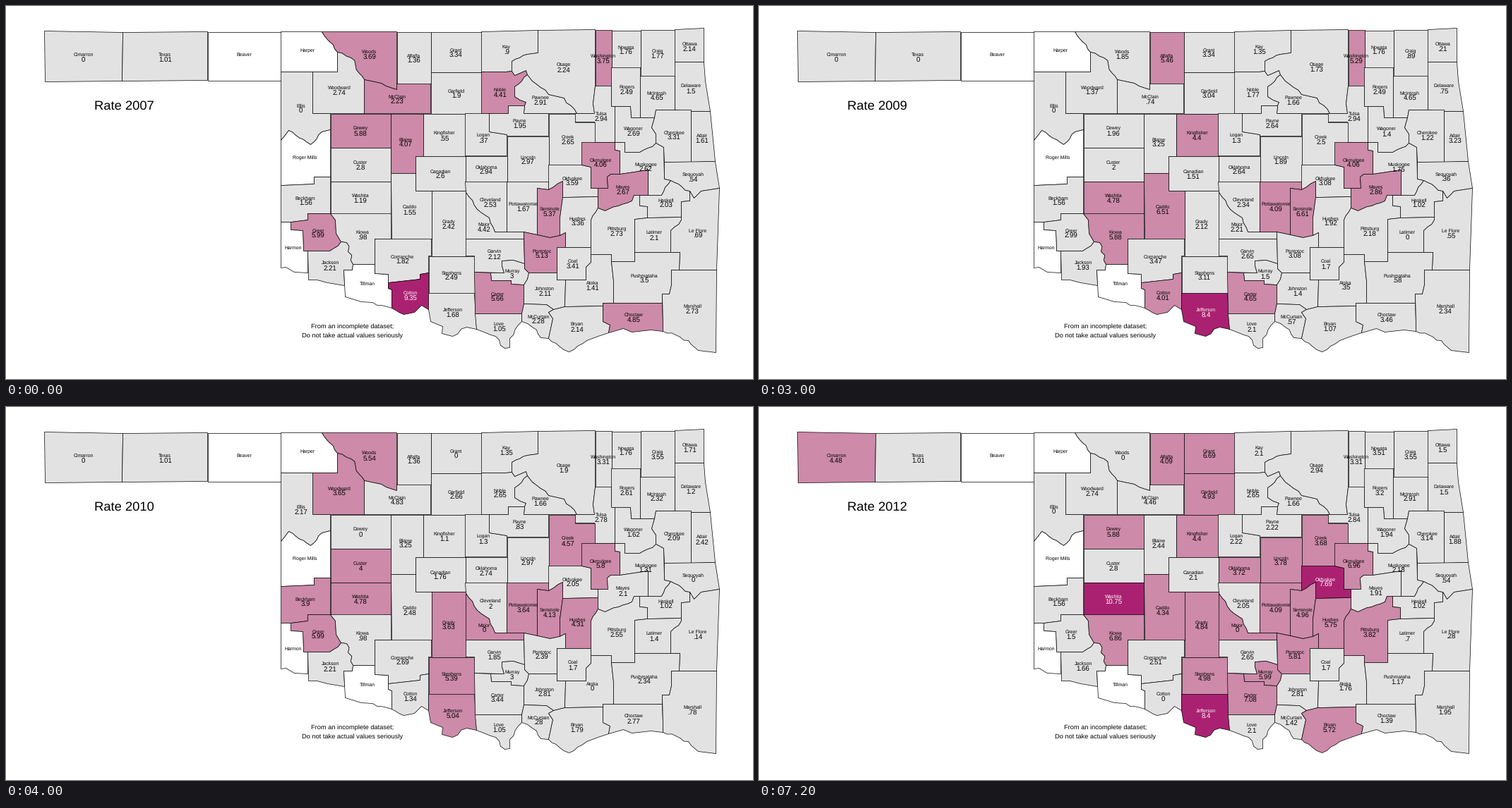
A matplotlib script that plays this animation: 1058x529 px, repeating every 8000 ms.

```python
import matplotlib.pyplot as plt
import numpy as np
from matplotlib.animation import FuncAnimation

W, H, DPI = 1058, 529, 100
PX = 72 / DPI
LOW, MID, HIGH = "#e2e2e2", "#cd8aa9", "#ab2171"
MID_FROM, HIGH_FROM = 3.6, 7.2

plt.rcParams.update({"font.family": "Liberation Sans", "text.hinting": "none"})
fig = plt.figure(figsize=(W / DPI, H / DPI), dpi=DPI, facecolor="white")
ax = fig.add_axes([0, 0, 1, 1])
ax.set_xlim(-0.5, W - 0.5)
ax.set_ylim(H - 0.5, -0.5)
ax.axis("off")

rates, areas, names, values = {}, {}, {}, {}


def label(x, y, text, size):
    return ax.text(x, y, text, fontsize=size * PX, ha="center",
                   va="baseline", color="black", zorder=3)


def border(a, b):
    """Survey lines run straight; slanted borders wind like a river.

    The seed comes from the end points, so both neighbours get one line.
    """
    p, q = np.array(sorted((a, b)))
    dx, dy = q - p
    if min(abs(dx), abs(dy)) <= 7:
        return [a]
    length = np.hypot(dx, dy)
    n = max(2, int(length / 6))
    sway = np.random.default_rng([*p, *q]).normal(0, 1.2, n + 1)
    sway[[0, -1]] = 0
    t = np.linspace(0, 1, n + 1)[:, None]
    line = p + t * (q - p) + sway[:, None] * [-dy / length, dx / length]
    return list((line if a < b else line[::-1])[:-1])


def centroid(points):
    x, y = points.T
    x2, y2 = np.roll(points, -1, axis=0).T
    cross = x * y2 - x2 * y
    return [(c * cross).sum() / (3 * cross.sum()) for c in (x + x2, y + y2)]


def county(name, data, *corners):
    """Draw a county from its corners, with the label at its centroid."""
    ends = list(zip(corners[::2], corners[1::2]))
    points = np.array([p for a, b in zip(ends, ends[1:] + ends[:1])
                       for p in border(a, b)], float)
    area = plt.Polygon(points, fc="white", ec="black", lw=0.7 * PX,
                       joinstyle="round", zorder=1)
    ax.add_patch(area)
    x, y = centroid(points)
    names[name] = label(x, y - 0.5, name, 6.9)
    if data:
        rates[name], areas[name] = data, area
        values[name] = label(x, y + 8, "", 9.7)


def box(name, data, x0, y0, x1, y1):
    county(name, data, x0, y0, x1, y0, x1, y1, x0, y1)


# Panhandle and north-west
county("Cimarron", [0, 0, 0, 0, 0, 4.48],
       54, 35, 165, 37, 164, 106, 55, 107)
county("Texas", [1.01, 2.02, 0, 1.01, 2.02, 1.01],
       165, 37, 285, 36, 285, 105, 164, 106)
box("Beaver", None, 285, 36, 389, 105)
county("Harper", None, 389, 36, 447, 36, 469, 65, 469, 93, 389, 93)
county("Woods", [3.69, 1.85, 1.85, 5.54, 1.85, 0],
       447, 36, 553, 36, 553, 118, 531, 109, 507, 104, 488, 73, 469, 65)
county("Woodward", [2.74, 3.65, 1.37, 3.65, 5.94, 2.74],
       469, 65, 488, 73, 507, 104, 507, 152, 434, 152, 434, 93, 469, 93)
county("McClain", [2.23, 1.86, .74, 4.83, 2.6, 4.46],
       507, 104, 531, 109, 553, 118, 553, 109, 601, 109, 601, 152, 507, 152)
county("Ellis", [0, 2.17, 0, 2.17, 6.51, 0],
       389, 93, 434, 93, 434, 152, 459, 152, 459, 175, 447, 178, 431, 196,
       400, 176, 389, 190)
county("Roger Mills", None,
       389, 190, 400, 176, 431, 196, 447, 178, 459, 175, 459, 242,
       436, 242, 436, 252, 389, 254)
box("Alfalfa", [1.36, 0, 5.46, 1.36, 0, 4.09], 553, 36, 601, 109)
box("Grant", [3.34, 0, 3.34, 0, 6.69, 6.69], 601, 36, 673, 93)
box("Garfield", [1.9, 1.14, 3.04, 2.66, 3.04, 4.93], 601, 93, 673, 152)

# North-east
county("Kay", [.9, 1.8, 1.35, 1.35, 2.1, 2.1],
       673, 36, 753, 34, 753, 66, 738, 68, 716, 78, 716, 92, 707, 93, 673, 93)
county("Noble", [4.41, 2.65, 1.77, 2.65, .88, 2.65],
       673, 93, 707, 93, 716, 92, 720, 98, 736, 91, 738, 97, 720, 114,
       720, 128, 736, 136, 734, 141, 711, 141, 711, 152, 673, 152)
county("Pawnee", [2.91, 2.08, 1.66, 1.66, 2.08, 1.66],
       720, 114, 738, 97, 745, 106, 768, 125, 790, 130, 808, 152, 733, 152,
       734, 141, 736, 136, 720, 128)
county("Osage", [2.24, 2.42, 1.73, 1.9, 1.9, 2.94],
       753, 34, 834, 33, 834, 113, 831, 138, 833, 152, 808, 152, 790, 130,
       768, 125, 745, 106, 738, 97, 736, 91, 720, 98, 716, 92, 716, 78,
       738, 68, 753, 66)
box("Washington", [3.75, 3.31, 5.29, 3.31, 2.2, 3.31], 834, 33, 857, 113)
box("Nowata", [1.76, .88, 1.76, 1.76, 2.64, 3.51], 857, 34, 898, 87)
box("Craig", [1.77, 2.66, .89, 3.55, .44, 3.55], 898, 33, 947, 99)
county("Ottawa", [2.14, 1.07, .21, 1.71, 1.28, 1.5],
       947, 33, 988, 31, 988, 79, 947, 79)
county("Delaware", [1.5, .6, .75, 1.2, 1.65, 1.5],
       947, 79, 988, 79, 990, 106, 997, 149, 970, 149, 947, 147)
county("Rogers", [2.49, 3.2, 2.49, 2.61, 2.37, 3.2],
       857, 87, 898, 87, 898, 158, 885, 158, 884, 142, 857, 142)
county("McIntosh", [4.65, 5.23, 4.65, 2.32, 1.74, 2.91],
       898, 99, 947, 99, 947, 147, 920, 147, 918, 158, 898, 158)
county("Tulsa", [2.94, 3.28, 2.94, 2.78, 2.61, 2.84],
       834, 113, 857, 113, 857, 142, 862, 142, 862, 193, 833, 193,
       833, 164, 805, 164, 805, 152, 833, 152, 831, 138)
county("Wagoner", [2.69, 1.08, 1.4, 1.62, 2.37, 1.94],
       862, 142, 884, 142, 885, 158, 918, 158, 914, 172, 920, 181,
       920, 194, 897, 207, 876, 207, 876, 193, 862, 193)
county("Cherokee", [3.31, 1.74, 1.22, 2.09, 2.62, 3.14],
       920, 147, 970, 147, 970, 221, 932, 221, 931, 200, 920, 194,
       920, 181, 914, 172, 918, 158)
county("Adair", [1.61, 2.69, 3.23, 2.42, 2.69, 1.88],
       970, 149, 997, 149, 1004, 220, 970, 221)
county("Sequoyah", [.54, .36, .36, 0, .73, .54],
       932, 221, 1004, 220, 1010, 258, 984, 262, 974, 272, 968, 262,
       941, 247, 932, 245)
county("Muskogee", [2.62, 3.28, 1.75, 1.31, 2.4, 2.18],
       862, 193, 876, 193, 876, 207, 897, 207, 920, 194, 931, 200, 932, 245,
       941, 247, 928, 268, 909, 268, 909, 232, 869, 238, 869, 205, 862, 204)
county("Haskell", [2.03, 4.07, 1.02, 1.02, 0, 1.02],
       897, 268, 928, 268, 941, 247, 968, 262, 968, 276, 956, 277,
       956, 299, 908, 300, 908, 284, 897, 283)

# Centre
box("Dewey", [5.88, 1.96, 1.96, 0, 0, 5.88], 459, 152, 544, 200)
box("Custer", [2.8, 5.2, 2, 4, 1.6, 2.8], 459, 200, 544, 248)
box("Washita", [1.19, 4.78, 4.78, 4.78, 1.19, 10.75], 459, 248, 544, 294)
county("Blaine", [4.07, 2.44, 3.25, 3.25, 4.88, 2.44],
       544, 152, 590, 152, 590, 212, 579, 212, 579, 236, 544, 236)
box("Kingfisher", [.55, 2.2, 4.4, 1.1, 2.2, 4.4], 590, 152, 650, 212)
county("Logan", [.37, 2.22, 1.3, 1.3, .74, 2.22],
       650, 152, 684, 152, 684, 178, 709, 182, 709, 212, 650, 212)
county("Payne", [1.95, 1.11, 2.64, .83, 1.67, 2.22],
       711, 141, 734, 141, 733, 152, 768, 152, 768, 184, 709, 184,
       709, 182, 684, 178, 684, 152, 711, 152)
county("Creek", [2.65, 3.98, 2.5, 4.57, 2.5, 3.68],
       768, 152, 805, 152, 805, 164, 833, 164, 833, 193, 815, 193,
       815, 225, 768, 225)
county("Canadian", [2.6, 1.93, 1.51, 1.76, 1.68, 2.1],
       590, 212, 650, 212, 650, 261, 579, 261, 579, 212)
box("Oklahoma", [2.94, 2.74, 2.64, 2.74, 3, 3.72], 650, 212, 709, 249)
box("Lincoln", [2.97, 1.62, 1.89, 2.97, 4.32, 3.78], 709, 184, 768, 249)
county("Caddo", [1.55, 6.82, 6.51, 2.48, 4.65, 4.34],
       544, 236, 579, 236, 579, 261, 602, 261, 602, 330, 545, 330)
box("Grady", [2.42, 3.33, 2.12, 3.63, 3.33, 4.84], 602, 261, 651, 354)
county("Cleveland", [2.53, 1.86, 2.34, 2, 1.95, 2.05],
       650, 249, 709, 249, 709, 320, 692, 320, 684, 300, 667, 288, 651, 264)
county("Major", [4.42, 2.21, 2.21, 0, 0, 0],
       651, 264, 667, 288, 684, 300, 692, 320, 733, 320, 733, 330, 651, 330)
county("Pottawatomie", [1.67, 4.09, 4.09, 3.64, 3.94, 4.09],
       709, 249, 768, 249, 768, 260, 752, 258, 752, 324, 733, 320, 709, 320)
county("Okfuskee", [3.59, 3.08, 3.08, 2.05, 5.64, 7.69],
       768, 225, 815, 225, 828, 228, 828, 258, 838, 258, 838, 270,
       788, 271, 788, 248, 768, 260)
county("Seminole", [5.37, 3.72, 6.61, 4.13, 4.96, 4.96],
       752, 258, 768, 260, 788, 248, 788, 271, 784, 300, 784, 325,
       770, 328, 752, 324)
county("Hughes", [3.36, 1.92, 1.92, 4.31, 5.75, 5.75],
       788, 271, 838, 270, 838, 286, 828, 303, 828, 342, 792, 342,
       792, 321, 784, 325, 784, 300)
county("Okmulgee", [4.06, 2.9, 4.06, 5.8, 4.06, 6.96],
       815, 193, 862, 193, 862, 204, 869, 205, 869, 238, 856, 238,
       851, 242, 852, 258, 828, 258, 828, 228, 815, 225)
county("Mayes", [2.67, 3.44, 2.86, 2.1, 2.1, 1.91],
       869, 238, 909, 232, 909, 268, 889, 268, 886, 276, 848, 290,
       838, 286, 838, 258, 852, 258, 851, 242, 856, 238)

# South-west
county("Beckham", [1.56, 1.17, 1.56, 3.9, 3.12, 1.56],
       389, 254, 436, 252, 436, 242, 459, 242, 459, 294, 427, 294,
       427, 303, 403, 306, 389, 306)
county("Greer", [5.99, 1.5, 2.99, 5.99, 1.5, 1.5],
       427, 294, 459, 294, 466, 303, 467, 322, 474, 334, 458, 347,
       421, 347, 420, 318, 403, 317, 403, 306, 427, 303)
county("Harmon", None,
       389, 306, 403, 306, 403, 317, 420, 318, 421, 347, 427, 347,
       427, 378, 408, 377, 396, 370, 389, 371)
county("Kiowa", [.98, 1.96, 5.88, .98, 10.78, 6.86],
       459, 294, 545, 294, 545, 330, 522, 330, 522, 366, 491, 366,
       482, 335, 474, 334, 467, 322, 466, 303)
county("Jackson", [2.21, 3.04, 1.93, 2.21, 2.76, 1.66],
       427, 347, 458, 347, 474, 334, 482, 335, 491, 366, 490, 374,
       478, 374, 479, 396, 455, 392, 440, 388, 428, 388)
county("Tillman", None,
       478, 374, 490, 374, 491, 366, 522, 366, 522, 379, 541, 380,
       541, 400, 546, 402, 546, 428, 519, 420, 503, 419, 480, 412)
county("Comanche", [1.82, 3.73, 3.47, 2.69, 3.12, 2.51],
       522, 330, 602, 330, 602, 354, 598, 354, 598, 378, 586, 380,
       586, 387, 541, 392, 541, 380, 522, 379)
county("Cotton", [9.35, 0, 4.01, 1.34, 2.67, 0],
       541, 392, 586, 387, 586, 380, 598, 378, 598, 430, 588, 424,
       578, 434, 563, 437, 546, 428, 546, 402, 541, 400)
box("Stephens", [2.49, 2.9, 3.11, 5.39, 3.32, 4.98], 598, 354, 663, 407)
county("Jefferson", [1.68, 3.36, 8.4, 5.04, 1.68, 8.4],
       598, 407, 663, 407, 666, 458, 652, 455, 632, 468, 617, 464,
       618, 454, 601, 447, 598, 430)
county("Garvin", [2.12, 2.91, 2.65, 1.85, 2.12, 2.65],
       651, 330, 733, 330, 734, 365, 718, 360, 702, 361, 702, 368,
       705, 378, 663, 377, 663, 354, 651, 354)
county("Murray", [3, 1.5, 1.5, 3, 3, 5.99],
       702, 361, 718, 360, 734, 365, 734, 372, 740, 378, 738, 387,
       733, 395, 715, 394, 715, 389, 687, 389, 686, 378, 705, 378, 702, 368)
county("Carter", [5.66, 3.44, 4.65, 3.44, 2.83, 7.08],
       663, 377, 686, 378, 687, 389, 715, 389, 715, 394, 733, 395,
       733, 422, 730, 436, 664, 436)
county("Love", [1.05, 0, 2.1, 1.05, 1.05, 2.1],
       664, 436, 730, 436, 730, 447, 713, 471, 713, 484, 706, 485,
       693, 468, 666, 458)

# South-east
county("Pontotoc", [5.13, 2.05, 3.08, 2.39, 4.79, 5.81],
       733, 320, 752, 324, 770, 328, 784, 325, 792, 321, 792, 342,
       780, 342, 780, 378, 740, 378, 734, 372)
county("Johnston", [2.11, .7, 1.4, 2.81, .7, 2.81],
       740, 378, 780, 378, 780, 388, 792, 388, 791, 426, 775, 430,
       765, 423, 733, 422, 733, 395, 738, 387)
county("Coal", [3.41, 3.41, 1.7, 1.7, 0, 1.7],
       780, 342, 828, 342, 828, 363, 821, 370, 821, 388, 780, 388)
county("Pittsburg", [2.73, 1.45, 2.18, 2.55, 2, 3.82],
       838, 286, 848, 290, 886, 276, 889, 268, 897, 268, 897, 283, 908, 284,
       908, 300, 890, 302, 890, 362, 857, 362, 857, 352, 828, 352, 828, 303)
county("Latimer", [2.1, 2.1, 0, 1.4, 2.1, .7],
       890, 302, 908, 300, 956, 299, 956, 303, 941, 318, 941, 349, 890, 349)
county("Le Flore", [.69, .55, .55, .14, .41, .28],
       968, 262, 974, 272, 984, 262, 1010, 258, 1006, 374, 953, 374,
       954, 349, 941, 349, 941, 318, 956, 303, 956, 277, 968, 276)
county("Atoka", [1.41, 1.06, .35, 0, 2.12, 1.76],
       828, 352, 857, 352, 857, 362, 860, 390, 860, 421, 845, 421,
       845, 425, 791, 426, 792, 388, 821, 388, 821, 370, 828, 363)
county("Pushmataha", [3.5, 2.34, .58, 2.34, 4.09, 1.17],
       857, 362, 890, 362, 890, 349, 954, 349, 953, 374, 942, 374, 942, 395,
       939, 408, 929, 408, 929, 421, 860, 421, 860, 390)
county("McCurtain", [2.28, .57, .57, .28, .57, 1.42],
       733, 422, 765, 423, 775, 430, 768, 434, 774, 443, 768, 471,
       757, 470, 745, 455, 730, 447, 730, 436)
county("Bryan", [2.14, .71, 1.07, 1.79, 2.14, 5.72],
       775, 430, 791, 426, 845, 425, 845, 447, 855, 452, 853, 463, 838, 468,
       822, 474, 797, 490, 783, 482, 768, 471, 774, 443, 768, 434)
county("Choctaw", [4.85, 2.08, 3.46, 2.77, 3.46, 1.39],
       845, 421, 929, 421, 930, 450, 930, 461, 913, 459, 886, 462,
       874, 457, 853, 463, 855, 452, 845, 447)
county("Marshall", [2.73, 1.17, 2.34, .78, .78, 1.95],
       942, 374, 1006, 374, 1005, 491, 980, 488, 966, 474, 930, 461,
       930, 450, 929, 408, 939, 408, 942, 395)

# The labels of these pairs are swapped: each is shaded by its partner's rate.
partner = {}
for a, b in [("McClain", "Major"), ("Mayes", "McIntosh"),
             ("Marshall", "McCurtain")]:
    partner[a], partner[b] = b, a

title = label(166.5, 146, "", 18.4)
label(490, 457, "From an incomplete dataset;", 9.3)
label(490, 470, "Do not take actual values seriously", 9.3)


def shade(rate):
    return HIGH if rate >= HIGH_FROM else MID if rate >= MID_FROM else LOW


def draw(second):
    # The first and last year each stay for two seconds.
    year = min(max(second - 1, 0), 5)
    title.set_text(f"Rate {2007 + year}")
    for name, data in rates.items():
        fill = shade(rates[partner.get(name, name)][year])
        ink = "white" if fill == HIGH else "black"
        areas[name].set_facecolor(fill)
        names[name].set_color(ink)
        values[name].set_color(ink)
        values[name].set_text(f"{data[year]:g}".lstrip("0") or "0")
    return []


anim = FuncAnimation(fig, draw, frames=8, interval=1000, repeat=True,
                     repeat_delay=0, init_func=lambda: draw(0), blit=False)
plt.show()
```
